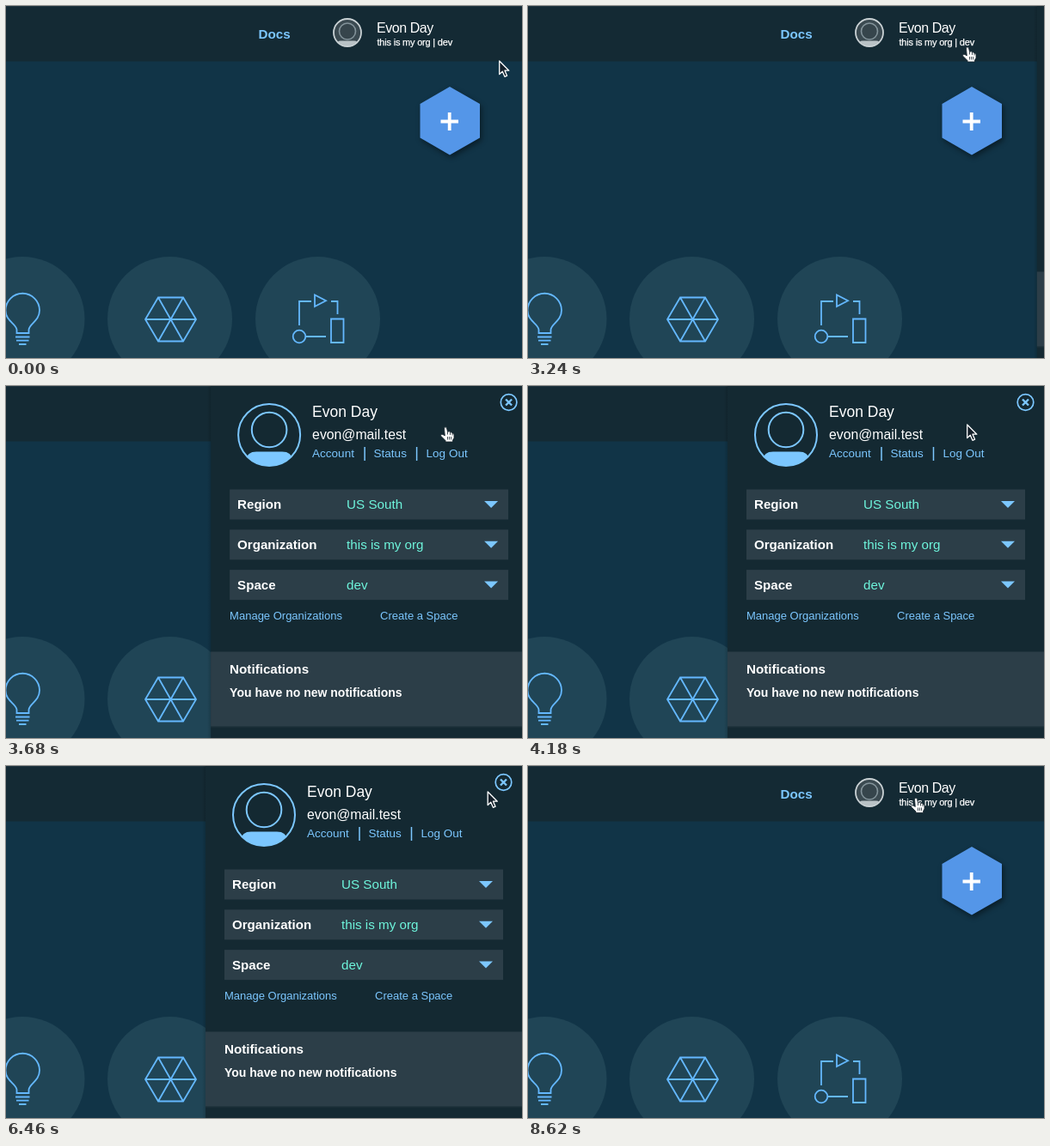
An HTML page that plays this animation: 600x410 px, repeating every 8640 ms.

```html
<!DOCTYPE html>
<html lang="en">
<head>
<meta charset="utf-8">
<title>Account panel</title>
<style>
  html, body { margin: 0; width: 100%; height: 100%; overflow: hidden; background: #113447; }
  svg { display: block; width: 600px; height: 410px; }
  text { font-family: "Liberation Sans", Arial, sans-serif; fill: #fff; white-space: pre; }
  .b { font-weight: bold; }
  .link { fill: #7cc7ff; }
  .value { fill: #6ef5dc; font-size: 15.2px; }
  .line { fill: none; stroke: #64b8ff; stroke-width: 1.8; }
  .sky { fill: none; stroke: #7cc7ff; }
  .add { filter: drop-shadow(2px 3px 3px rgba(0, 0, 0, .45)); }
</style>
</head>
<body>
<svg viewBox="0 0 600 410">
  <defs>
    <clipPath id="face"><circle cx="68" cy="57" r="36"/></clipPath>
    <clipPath id="mini"><circle cx="397" cy="31" r="15.5"/></clipPath>
    <linearGradient id="edge">
      <stop offset="0" stop-color="#000" stop-opacity="0"/>
      <stop offset="1" stop-color="#000" stop-opacity=".15"/>
    </linearGradient>
  </defs>

  <rect width="600" height="410" fill="#113447"/>
  <rect width="600" height="64.5" fill="#142a34"/>
  <rect width="600" height="1" fill="#20363f"/>
  <text class="b link" x="293.5" y="38" font-size="15.2">Docs</text>

  <circle cx="397" cy="31" r="16" fill="#3b4a51"/>
  <g clip-path="url(#mini)">
    <rect x="384" y="40.5" width="26" height="14" rx="5" fill="#b9c2c6"/>
  </g>
  <circle cx="397" cy="29.5" r="9.5" fill="#36454c" stroke="#83939a" stroke-width="1.6"/>
  <circle cx="397" cy="31" r="16" fill="none" stroke="#c9d1d4" stroke-width="1.8"/>
  <text x="431" y="31" font-size="16" letter-spacing="-.45">Evon Day</text>
  <text x="431.5" y="45.5" font-size="11" letter-spacing="-.2" stroke="#fff" stroke-width=".25">this is my org | dev</text>

  <path class="add" fill="#5496e8" d="M516 94L551 114V153.5L516 173.5L481.5 153.5V114Z"/>
  <path d="M505.5 134.5H526M515.7 124V145" stroke="#fff" stroke-width="3.8"/>

  <g fill="#204556">
    <circle cx="19" cy="364.5" r="72.5"/>
    <circle cx="190.5" cy="364.5" r="72.5"/>
    <circle cx="362.5" cy="364.5" r="72.5"/>
  </g>
  <g class="line">
    <path d="M12.5 381V377C12 370 -.5 367 -.5 354.5A19.7 19.7 0 0 1 39 354.5C39 367 27 370 26.5 377V381ZM11 385.5H27.5M12 389.7H26.5M15 394H23.5"/>
    <path d="M162 365L177 339.5H206L221 365L206 390.5H177ZM162 365H221M177 339.5L206 390.5M206 339.5L177 390.5"/>
    <path d="M341 372V344H355M359 336.5V350L372 343.3ZM378 344H385.5V359M378 364.5H392.5V392H378ZM348.5 385H372"/>
    <circle cx="341" cy="385" r="7.3"/>
  </g>

  <g id="panel">
    <rect x="-4" width="4" height="410" fill="url(#edge)"/>
    <rect width="380" height="410" fill="#142932"/>
    <g clip-path="url(#face)">
      <path fill="#7cc7ff" d="M41 96V86Q42 76.5 53 76.5H83Q94 76.5 95 86V96Z"/>
    </g>
    <g class="sky" stroke-width="2">
      <circle cx="68" cy="57" r="36"/>
      <circle cx="68" cy="51" r="20.3"/>
    </g>
    <text x="118" y="36" font-size="17.5">Evon Day</text>
    <text x="118" y="62" font-size="15.8">evon@mail.test</text>
    <g font-size="13.5">
      <text class="link" x="118" y="82.5">Account</text>
      <text class="link" x="189.5" y="82.5">Status</text>
      <text class="link" x="250.5" y="82.5">Log Out</text>
    </g>
    <path class="sky" d="M179 71V87M239.5 71V87" stroke-width="1.5"/>
    <g id="rows"></g>
    <g font-size="13">
      <text class="link" x="22" y="272">Manage Organizations</text>
      <text class="link" x="197" y="272">Create a Space</text>
    </g>
    <rect y="309.5" width="380" height="87" fill="#2c3e48"/>
    <rect y="396" width="380" height="1.5" fill="#20343d"/>
    <text class="b" x="22" y="335" font-size="15.2">Notifications</text>
    <text class="b" x="22" y="362" font-size="14">You have no new notifications</text>
    <g class="sky">
      <circle cx="346.5" cy="19" r="9.3" stroke-width="1.7"/>
      <path d="M343 15.5L350 22.5M350 15.5L343 22.5" stroke-width="2.4"/>
    </g>
  </g>

  <g id="cursor">
    <path id="arrow" fill="#15202a" stroke="#fff" stroke-width="1.3" stroke-linejoin="round"
      d="M.7 1V16.5L4.3 13.2L6.9 19.3L9.6 18.2L7 12.2H11.8Z"/>
    <g id="hand" stroke="#17242c" stroke-width=".8" stroke-linejoin="round">
      <path fill="#fff"
        d="M-1.5 1.5Q0 -1 1.5 1.5L2.5 6Q4.5 4.5 5.5 6.5Q7.3 5.5 8 7.5Q10 7 10 9.5V13L8.5 15.5V17.5H0V16L-5.5 10.5Q-5.5 8 -3 9L-.7 10.5Z"/>
      <path fill="none" d="M2.5 6V9M5.5 6.5V9.5M8 7.5V10M2.5 11.5V15M4.5 11.5V15M6.5 11.5V15"/>
    </g>
  </g>
</svg>
<script>
  const LOOP = 8640, OPEN = 232, SHUT = 608, SLIDE = 535;
  const $ = id => document.getElementById(id);

  $("rows").innerHTML = [["Region", "US South"], ["Organization", "this is my org"], ["Space", "dev"]]
    .map(([label, value], i) => `<g transform="translate(0 ${i * 46.8})">
      <rect x="22" y="120.5" width="324" height="35" fill="#2c3e48"/>
      <text class="b" x="31" y="143" font-size="15.1">${label}</text>
      <text class="value" x="158" y="143">${value}</text>
      <path class="link" d="M318 134H334L326 142Z"/></g>`).join("");

  // time, x, y of the pointer's hot spot
  const path = [
    [0, 573, 63], [120, 573, 63], [860, 507, 53], [1380, 506, 52], [1800, 506, 52],
    [2100, 511, 47.5], [3700, 511, 47.5], [3900, 510, 44], [5300, 510, 44],
    [6160, 551, 34], [6460, 559.5, 29], [6750, 576, 18], [7960, 576, 18], [8600, 451, 37], [LOOP, 451, 37]
  ];
  const handTimes = [[2000, 3760], [6700, 7320], [8320, LOOP]];

  const clamp = v => Math.min(1, Math.max(0, v));
  const ease = v => (1 - Math.cos(Math.PI * clamp(v))) / 2;

  function pointer(t) {
    const i = path.findIndex(p => p[0] > t);
    const [t0, x0, y0] = path[i - 1], [t1, x1, y1] = path[i];
    const k = ease((t - t0) / (t1 - t0));
    return [x0 + (x1 - x0) * k, y0 + (y1 - y0) * k];
  }

  function draw(t) {
    const shown = ease((t - 3190) / SLIDE) - ease((t - 6980) / SLIDE);
    const x = shown > 0 ? 600 + (OPEN - 600) * shown : SHUT;
    $("panel").setAttribute("transform", `translate(${x} 0)`);
    $("cursor").setAttribute("transform", `translate(${pointer(t)})`);
    const hand = handTimes.some(([from, to]) => t >= from && t < to);
    $("hand").setAttribute("visibility", hand ? "visible" : "hidden");
    $("arrow").setAttribute("visibility", hand ? "hidden" : "visible");
  }

  const start = performance.now();
  function tick() {
    draw((performance.now() - start) % LOOP);
    requestAnimationFrame(tick);
  }
  tick();
</script>
</body>
</html>
```
